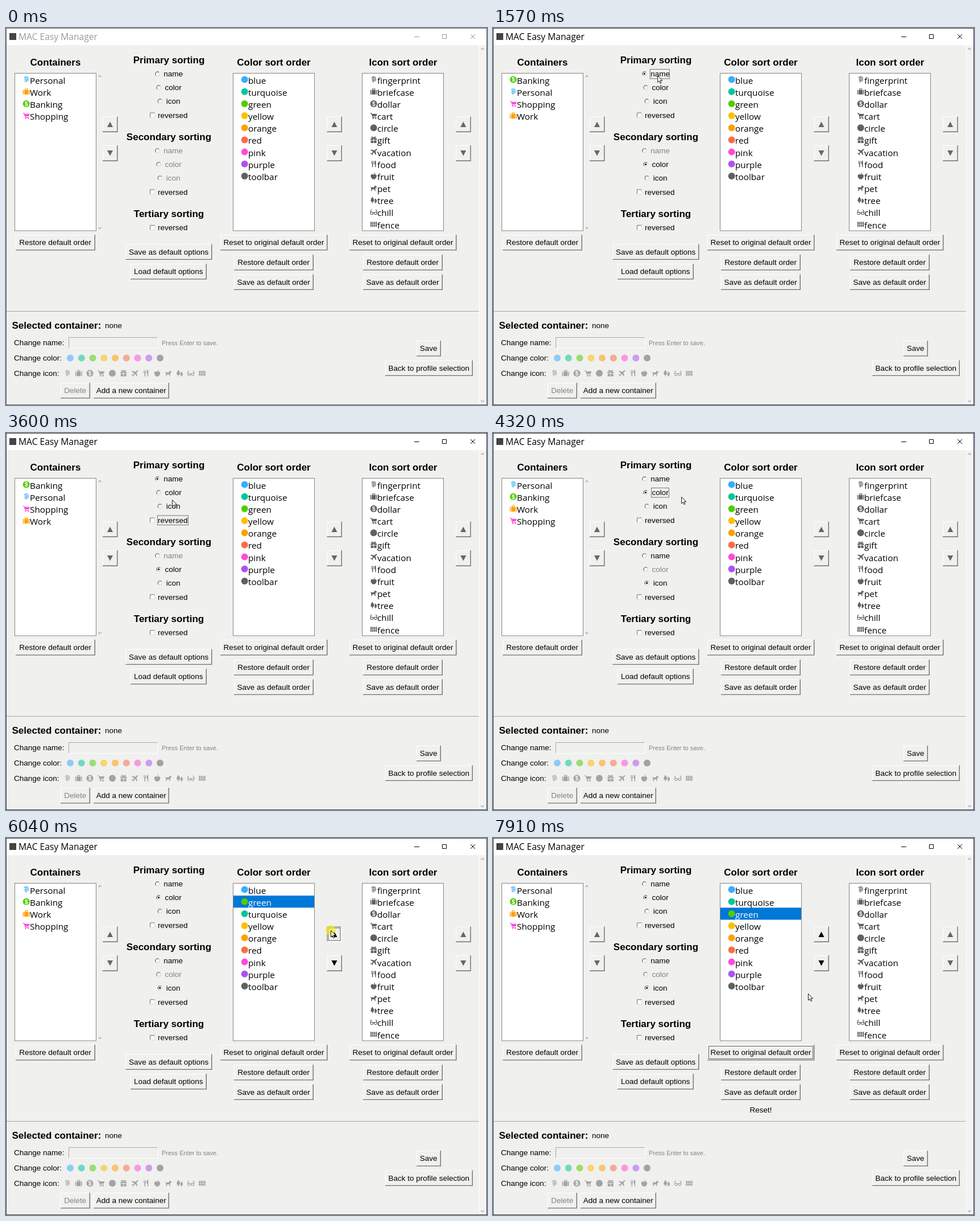
These frames come from a looping animation (846 px wide and 662 px high, 8 s). An HTML page:

```html
<!DOCTYPE html>
<html lang="en">
<head>
<meta charset="utf-8">
<title>MAC Easy Manager</title>
<style>
html, body { margin: 0; width: 100%; height: 100%; overflow: hidden; background: #f0f0ee; }
svg { display: block; width: 846px; height: 662px; }
text { white-space: pre; }
.ui { font: 13.5px "Liberation Sans", Arial, sans-serif; }
.head { font: bold 17px "Liberation Sans", Arial, sans-serif; }
.hint { font: 11px "Liberation Sans", Arial, sans-serif; }
.row { font: 15.3px "Open Sans", "Noto Sans", sans-serif; }
.title { font: 15.6px "Open Sans", "Noto Sans", sans-serif; }
</style>
</head>
<body>
<svg id="stage" viewBox="0 0 846 662"></svg>
<script>
const stage = document.getElementById('stage');
const LOOP = 8000, ROW = 21.17, BG = '#f0f0ee', GREY = '#838383', DARK = '#606060';

const COLORS = {
  blue: '#37adff', turquoise: '#00c79a', green: '#51cd00', yellow: '#ffbf00', orange: '#ffa000',
  red: '#ff6b45', pink: '#ff4bda', purple: '#af51f5', toolbar: DARK
};

// Glyphs fit a 12 x 12 box around the origin and inherit their colour.
const ICONS = {
  fingerprint: '<path fill="none" stroke="currentColor" stroke-width="1.1" d="M-3.5-2.5C-3-6 3.5-6 3.5-1.5Q3.5 1 3 3M-3.2 1.5Q-2 .5-1.8-1.5C-1.5-4 1.8-3.5 1.6-.8Q1.3 3-.8 5M0-1.2Q0 2-2.5 4"/>',
  briefcase: '<path d="M-6-3h1.5v8H-6zM-3.5-3h7v8h-7zM4.5-3H6v8H4.5z"/><path fill="none" stroke="currentColor" stroke-width="1.2" d="M-2-3v-2h4v2"/>',
  dollar: '<circle r="6"/><text y="3.8" text-anchor="middle" fill="#fff" style="font:bold 10px \'Liberation Sans\',sans-serif">$</text>',
  cart: '<path d="M-6-5h2.5l.6 1.7H6L4.5 1h-6l.4 1.2H4.5v1.1h-6.4L-4.4-3.9H-6z"/><circle cx="-1" cy="4.4" r="1.2"/><circle cx="3.6" cy="4.4" r="1.2"/>',
  circle: '<circle r="6"/>',
  gift: '<path d="M-5.5-2.5h5v2.5h-5zM.5-2.5h5v2.5h-5zM-5 1h4.5v4.5H-5zM.5 1H5v4.5H.5z"/><path fill="none" stroke="currentColor" stroke-width="1.2" d="M0-3C-5-3-4-6-2-5Q-.5-4 0-3 .5-4 2-5C4-6 5-3 0-3"/>',
  vacation: '<path d="M6-5.5 4-5 1.5-2.5-4.5-4-5.5-3-1 0-3.5 2.5-5.5 2-6 3l2.5 1L-2.5 6l1-.5L-2 3.5.5 1 3.5 5.5l1-1L3-1 5.5-3.5z"/>',
  food: '<path d="M-4-5.5h.8v4h.8v-4h.8v4h.8v-4H0V-1L-1.2 0v5.5h-1.6V0L-4-1zM2-5.5h2v11H2.5V1H1.5Q1-4 2-5.5z"/>',
  fruit: '<path d="M0-2.5C6-5.5 7 2 2 5.5H-2C-7 2-6-5.5 0-2.5zM0-3Q0-5.5 2.5-6 2.5-3.5 0-3z"/>',
  pet: '<path d="M-6-3.2-5.2-1.5H1L1.8-4.8 3-3.8 5.8-2.8 5-1.2 3.6-.8 3 1.2V5H1.6V2H-2.6L-3 5h-1.4V0L-6-2z"/>',
  tree: '<path d="M-2.3-5.8C0-3 1.2 0 .5 1.8Q0 3-1.7 3v2.5h-1.2V3Q-4.6 3-5.1 1.8C-5.8 0-4.6-3-2.3-5.8zM3.1-3C5-1 6 1.2 5.5 2.8Q5 4 3.7 4v1.7H2.5V4H1.2Q2.6 1.5 1.5-1z"/>',
  chill: '<g fill="none" stroke="currentColor" stroke-width="1.2"><path d="M-5.5 1.5v-4l2-2M5.5 1.5v-4l-2-2M-1 1.5Q0 0 1 1.5"/><rect x="-5.5" y="0" width="4.5" height="4" rx="1.8"/><rect x="1" y="0" width="4.5" height="4" rx="1.8"/></g>',
  fence: '<path d="M-5.5-4l.9-1 .9 1v8.5h-1.8zM-2.3-4l.8-1 .8 1v8.5h-1.6zM.7-4l.8-1 .8 1v8.5H.7zM3.7-4l.9-1 .9 1v8.5H3.7zM-6-2.5H6v.9H-6zM-6 2H6v.9H-6z"/>'
};

const CONTAINERS = {
  Personal: ['fingerprint', COLORS.blue], Work: ['briefcase', COLORS.orange],
  Banking: ['dollar', COLORS.green], Shopping: ['cart', COLORS.pink]
};

const FOCUS_WIDTH = { name: 34, color: 31, icon: 26, reversed: 54 };

// Timed state: [time, value]; the latest entry that has begun applies.
const ORDERS = [
  [0, 'Personal Work Banking Shopping'], [1190, 'Banking Personal Shopping Work'],
  [2510, 'Work Shopping Personal Banking'], [3280, 'Banking Personal Shopping Work'],
  [4080, 'Personal Banking Work Shopping'], [6130, 'Banking Personal Work Shopping'],
  [7380, 'Personal Banking Work Shopping']
];
const SORTS = [[0, ['', '']], [1190, ['name', 'color']], [4080, ['color', 'icon']]];
const FOCUS = [[0, ''], [1100, '1name'], [2430, '1reversed'], [3980, '1color'], [5020, 'list'], [5720, 'up'], [7300, 'reset']];
const GREEN_ROW = [[0, 2], [5820, 1], [6130, 0], [7380, 2]];
const CLICKS = [[1100, 1190], [2430, 2510], [3200, 3280], [3980, 4080], [5020, 5100], [5720, 5820], [6040, 6130], [7300, 7380]];

// Pointer moves: start, end, steps, x, y, and whether it only slows down.
const MOVES = [
  [70, 860, 12, 289, 78], [960, 961, 1, 289, 80], [1570, 2330, 10, 292, 151],
  [3360, 3840, 7, 292, 106, true], [4220, 4640, 6, 431, 127], [4870, 4871, 1, 433, 128],
  [5180, 5570, 6, 571, 162], [6600, 7060, 7, 494, 384], [7690, 7910, 4, 554, 273]
];

const at = (t, list) => list.reduce((value, [start, next]) => t >= start ? next : value, null);
const ease = (k, out) => out ? 1 - (1 - k) ** 1.65 : .3 * k + .7 * k * k * (3 - 2 * k);

function pointer(t) {
  let x = 820, y = 648;
  for (const [start, end, steps, toX, toY, out] of MOVES) {
    if (t < start) break;
    const step = Math.min(steps, Math.floor((t - start) / (end - start) * (steps - 1) + 1.001));
    const k = ease(step / steps, out);
    x += (toX - x) * k;
    y += (toY - y) * k;
  }
  return [x, y];
}

const text = (s, x, y, cls = 'ui', fill = '#000', anchor = 'start') =>
  `<text class="${cls}" x="${x}" y="${y}" fill="${fill}" text-anchor="${anchor}">${s}</text>`;
const rect = (x, y, w, h, fill, stroke = 'none') =>
  `<rect x="${x}" y="${y}" width="${w}" height="${h}" fill="${fill}" stroke="${stroke}"/>`;
const line = (d, stroke, width = 1) => `<path d="${d}" fill="none" stroke="${stroke}" stroke-width="${width}"/>`;
const dot = (x, y, fill, r = 6, extra = '') => `<circle cx="${x}" cy="${y}" r="${r}" fill="${fill}" ${extra}/>`;
const icon = (name, x, y, color) =>
  `<g transform="translate(${x} ${y})" fill="${color}" color="${color}">${ICONS[name]}</g>`;
const heading = (s, x, y) => text(s, x, y, 'head', '#000', 'middle');

function bevel(x, y, w, h, sunken, focused) {
  const [light, dark] = sunken ? ['#777', '#fff'] : ['#fff', '#707070'];
  return rect(x, y, w, h, BG)
    + line(`M${x + .5} ${y + h}V${y + .5}H${x + w}`, light)
    + line(`M${x} ${y + h - .7}H${x + w - .7}V${y}`, dark, 1.4)
    + (focused ? rect(x + 2.5, y + 2.5, w - 5.5, h - 5.5, 'none', '#666') : '');
}

function button(s, x, y, w, { fill, focused, sunken } = {}) {
  return bevel(x, y, w, 27.6, sunken, focused) + text(s, x + w / 2 - .3, y + 18.3, 'ui', fill, 'middle');
}

function arrows(x, upFill, downFill, sunken, focused) {
  return bevel(x, 155.5, 26.5, 27.5, sunken, focused) + bevel(x, 206, 26.5, 28)
    + `<path d="M${x + 8} 174h10l-5-9.5z" fill="${upFill}"/><path d="M${x + 8} 215h10l-5 9.5z" fill="${downFill}"/>`;
}

function listbox(x, rows, selected = -1, focused) {
  let out = rect(x + .5, 79.5, 143, 276.5, '#fff', '#858585');
  rows.forEach(([name, glyph, color], i) => {
    const y = 80 + i * ROW;
    if (i === selected) {
      out += rect(x + 1, y, 142, ROW, '#0078d7');
      if (focused) out += rect(x + 27.5, y + 1, 41, ROW - 2, 'none', '#4c9bdd');
    }
    out += icon(glyph, x + 20.7, y + 10.6, color)
      + text(name, x + 27, y + 17.6, 'row', i === selected ? '#fff' : '#000');
  });
  return out;
}

const focusBox = (name, x, y) => rect(x - .5, y - 8, FOCUS_WIDTH[name], 16.5, 'none', '#777');

function radio(name, x, y, on, disabled) {
  return dot(x, y, '#fff', 3.7, 'stroke="#d0d0d0"')
    + line(`M${x - 2.6} ${y + 2.6}A3.7 3.7 0 0 1 ${x + 2.6} ${y - 2.6}`, '#6a6a6a', 1.1)
    + (on ? dot(x, y, '#000', 1.6) : '')
    + text(name, x + 11, y + 4.8, 'ui', disabled ? GREY : '#000');
}

function checkbox(y, checked) {
  return rect(253, y - 4, 8, 8, '#fff') + line(`M253.5 ${y + 4}v-8h8`, '#707070') + line(`M253 ${y + 4.2}h8.2v-8`, '#dcdcdc')
    + (checked ? line(`M254.7 ${y}l2 2.2 3.2-4.4`, '#000', 1.4) : '')
    + text('reversed', 267, y + 4.8);
}

function sortGroup(title, y, selected, disabled, checked, focus) {
  let out = heading(title, 286.5, y + 5.5);
  ['name', 'color', 'icon'].forEach((name, i) => {
    const x = 266.3 + 2.2 * i, rowY = y + 24 + 24 * i;
    out += radio(name, x, rowY, name === selected, disabled.includes(name));
    if (focus === name) out += focusBox(name, x + 10.5, rowY);
  });
  out += checkbox(y + 96.5, checked);
  return out + (focus === 'reversed' ? focusBox('reversed', 267, y + 96.5) : '');
}

const chevron = (x, y, dir) => line(`M${x - 2.5} ${y + dir}l2.5 ${-2.5 * dir} 2.5 ${2.5 * dir}`, '#a0a0a0', 1.1);

function windowFrame(active) {
  const ink = active ? '#000' : '#999';
  return rect(0, 0, 846, 662, BG) + rect(0, 0, 846, 30, '#fff')
    + rect(6, 9, 12, 12, '#444') + text('MAC Easy Manager', 22, 21, 'title', ink)
    + line('M718 15.5h9M767.5 11.5h7v7h-7zM817 11l8 8M825 11l-8 8', ink)
    + rect(832, 30, 13, 631, '#f3f3f3') + line('M832.5 30V661', '#fff')
    + chevron(838, 37, 1) + chevron(838, 655, -1)
    + line('M1 497.5H832', '#a8a8a8')
    + rect(.5, .5, 845, 661, 'none', active ? '#444' : '#666');
}

function editor() {
  let out = text('Selected container:', 10.5, 528.3, 'head') + text('none', 174, 527.3)
    + text('Change name:', 14, 557.3) + text('Change color:', 14, 584.3) + text('Change icon:', 14, 611.3)
    + line('M110.5 562V543.5H268', '#a8a8a8') + line('M110 562.5H267.5V543', '#fff')
    + text('Press Enter to save.', 274, 557, 'hint', GREY) + '<g opacity=".53">';
  Object.values(COLORS).forEach((color, i) => out += dot(113 + 19.75 * i, 579.5, color));
  Object.keys(ICONS).forEach((name, i) => out += icon(name, 108 + 19.75 * i, 606.3, DARK));
  return out + '</g>' + button('Delete', 96, 623, 52, { fill: GREY }) + button('Add a new container', 154, 623, 133)
    + button('Save', 722, 549, 43) + button('Back to profile selection', 667, 583.5, 154);
}

function cursor(t) {
  if (t < 70) return '';
  const [x, y] = pointer(t);
  const clicked = CLICKS.some(([down, up]) => t >= down && t < up);
  return (clicked ? dot(x, y, '#f2ee1c', 9, 'opacity=".65"') : '')
    + `<path transform="translate(${x} ${y})" d="M.5.5V12L3.1 9.5 5 13.7 6.8 12.9 4.9 8.8H8.7Z" fill="#fff" stroke="#000" stroke-width=".9"/>`;
}

function picture(t) {
  const focus = at(t, FOCUS), [first, second] = at(t, SORTS), greenRow = at(t, GREEN_ROW);
  const picked = t >= 5020;
  const upPressed = CLICKS.slice(5, 7).some(([down, up]) => t >= down && t < up);
  const colorOrder = Object.keys(COLORS).filter(name => name !== 'green');
  colorOrder.splice(greenRow, 0, 'green');
  const ink = on => on ? '#000' : '#666';

  return windowFrame(t >= 1100)
    + heading('Containers', 87, 65.7) + heading('Color sort order', 471, 65.7) + heading('Icon sort order', 698.5, 65.7)
    + listbox(15, at(t, ORDERS).split(' ').map(name => [name, ...CONTAINERS[name]]))
    + chevron(165, 85, 1) + chevron(165, 351, -1)
    + listbox(399, colorOrder.map(name => [name, 'circle', COLORS[name]]), picked ? greenRow : -1, focus === 'list')
    + listbox(626, Object.keys(ICONS).map(name => [name, name, DARK]))
    + arrows(170, ink(false), ink(false))
    + arrows(564.5, ink(picked && greenRow > 0), ink(picked), upPressed, focus === 'up')
    + arrows(791.3, ink(false), ink(false))
    + sortGroup('Primary sorting', 56.5, first, [], t >= 2510 && t < 3280, focus.slice(1))
    + sortGroup('Secondary sorting', 191.3, second, first || ['name', 'color', 'icon'], false, '')
    + heading('Tertiary sorting', 286.5, 331.6) + checkbox(350.5)
    + button('Restore default order', 17, 363, 140)
    + button('Save as default options', 210.5, 379.5, 152) + button('Load default options', 219, 414, 134)
    + button('Reset to original default order', 377, 363, 188.5, { focused: focus === 'reset', sunken: t >= 7300 && t < 7380 })
    + button('Reset to original default order', 604, 363, 188.5)
    + [401, 628].map(x => button('Restore default order', x, 398, 140) + button('Save as default order', x, 432.5, 140)).join('')
    + (t >= 7380 ? text('Reset!', 471, 482, 'ui', '#000', 'middle') : '')
    + editor() + cursor(t);
}

let shown = '';
function tick() {
  const next = picture(performance.now() % LOOP);
  if (next !== shown) stage.innerHTML = shown = next;
  requestAnimationFrame(tick);
}
tick();
</script>
</body>
</html>
```
